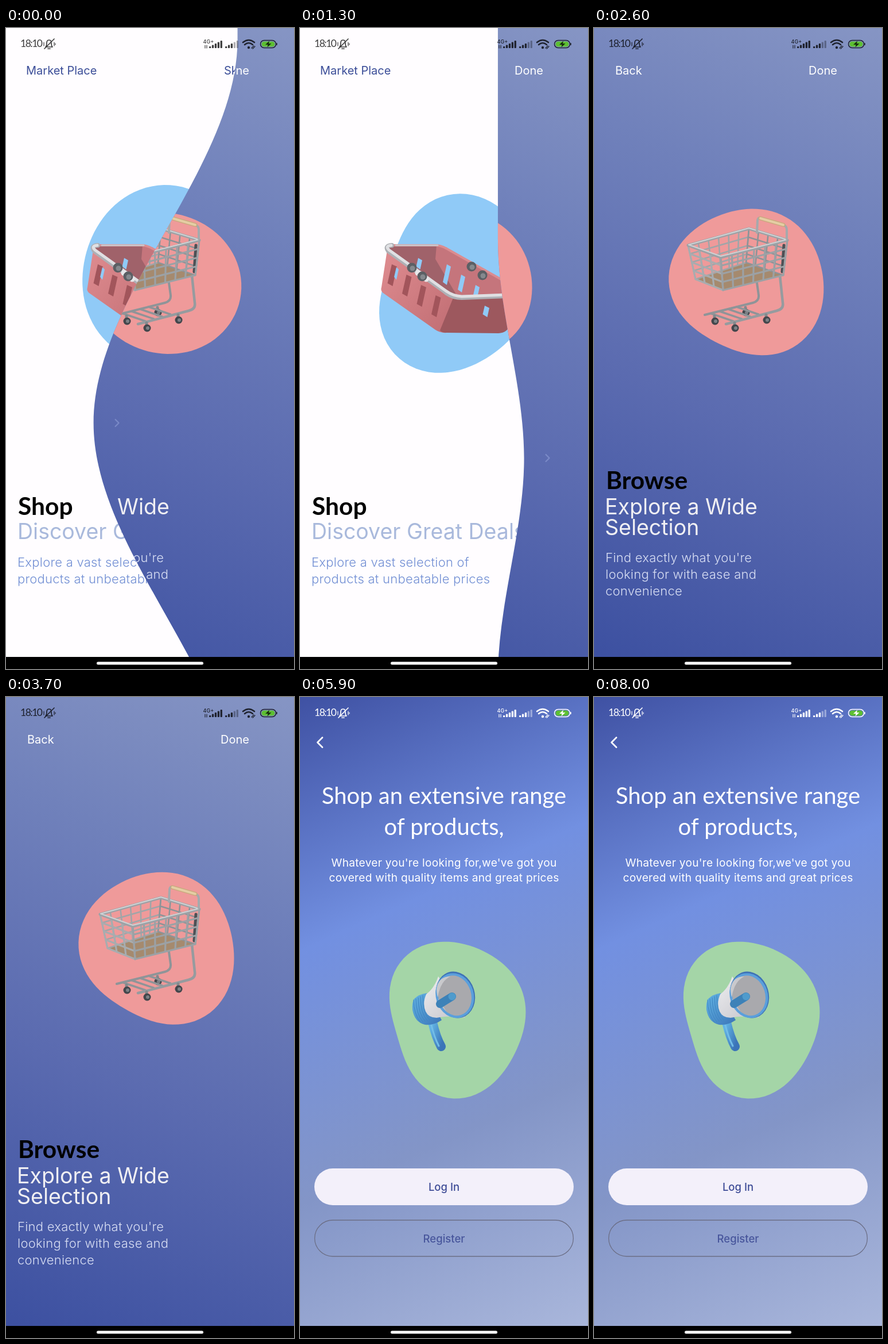
These frames come from a looping animation (502 by 1115 pixels, 8100 ms). An HTML page:

```html
<!DOCTYPE html>
<html lang="en">
<head>
<meta charset="utf-8">
<title>Shop onboarding</title>
<style>
html, body { margin: 0; width: 100%; height: 100%; overflow: hidden; background: #000; }
svg { display: block; width: 100%; height: 100%; font-family: Inter, "Open Sans", sans-serif; }
text { white-space: pre; }
.bar { font-size: 20px; }
.big { font-size: 37.5px; }
.note { font-size: 22px; font-weight: 300; letter-spacing: .25px; }
.fancy { font-family: Lato, sans-serif; }
.word { font-size: 42.5px; font-weight: 700; }
.mid { text-anchor: middle; }
.line { fill: none; stroke-linecap: round; stroke-linejoin: round; }
</style>
</head>
<body>
<svg viewBox="0 0 502 1115" preserveAspectRatio="none">
  <defs>
    <linearGradient id="dusk" gradientUnits="userSpaceOnUse" x1="502" y1="0" x2="0" y2="1115">
      <stop offset="0" stop-color="#8695c4"/>
      <stop offset=".28" stop-color="#7081bb"/>
      <stop offset=".6" stop-color="#5b6bb0"/>
      <stop offset="1" stop-color="#3b4fa0"/>
    </linearGradient>
    <linearGradient id="dawn" gradientUnits="userSpaceOnUse" x1="0" y1="0" x2="502" y2="1115">
      <stop offset="0" stop-color="#3f51a3"/>
      <stop offset=".33" stop-color="#7290e1"/>
      <stop offset=".66" stop-color="#8395c7"/>
      <stop offset="1" stop-color="#abb8dc"/>
    </linearGradient>
    <linearGradient id="front" x1="0" y1="0" x2="1" y2="1">
      <stop offset="0" stop-color="#df8c90"/>
      <stop offset="1" stop-color="#c06d73"/>
    </linearGradient>
    <linearGradient id="tube" x1="0" y1="0" x2="1" y2="1">
      <stop offset="0" stop-color="#62b4e4"/>
      <stop offset="1" stop-color="#3b74b8"/>
    </linearGradient>
    <linearGradient id="horn" x1="0" y1="0" x2="1" y2="1">
      <stop offset="0" stop-color="#eeeef0"/>
      <stop offset="1" stop-color="#c3c3ca"/>
    </linearGradient>
    <clipPath id="reveal"><path id="edge"/></clipPath>
  </defs>

  <g id="shop">
    <rect width="502" height="1115" fill="#fffdff"/>
    <path id="blueBlob" fill="#90caf7"/>
    <g id="basket"></g>
    <g fill="#3b4d98" class="bar">
      <text x="35" y="81">Market Place</text>
      <text x="380" y="81">Skip</text>
    </g>
    <text class="fancy word" x="21" y="847">Shop</text>
    <text class="big" x="20" y="889" fill="#a9b9dc">Discover Great Deals</text>
    <g class="note" fill="#728fd4">
      <text x="20" y="937">Explore a vast selection of</text>
      <text x="20" y="966">products at unbeatable prices</text>
    </g>
  </g>

  <g id="browse" clip-path="url(#reveal)">
    <rect width="502" height="1115" fill="url(#dusk)"/>
    <path id="pinkBlob" fill="#ef9a9a"/>
    <g id="cart"></g>
    <g fill="#fff" class="bar">
      <text x="37" y="81">Back</text>
      <text x="374" y="81">Done</text>
    </g>
    <text class="fancy word" x="21" y="802">Browse</text>
    <g class="big" fill="#f0eff3">
      <text x="19" y="846">Explore a Wide</text>
      <text x="19" y="882">Selection</text>
    </g>
    <g class="note" fill="#d9dff4">
      <text x="20" y="929">Find exactly what you're</text>
      <text x="20" y="958">looking for with ease and</text>
      <text x="20" y="987">convenience</text>
    </g>
  </g>
  <g id="knob">
    <circle id="disc" r="31" fill="#fff"/>
    <path class="line" d="M-3 -6L3 0L-3 6" stroke="#a9b9ea" stroke-width="2.2" opacity=".4"/>
  </g>

  <g id="login">
    <rect width="502" height="1115" fill="url(#dawn)"/>
    <path class="line" d="M39 70.500L30.500 79L39 87.500" stroke="#fff" stroke-width="2.800"/>
    <g class="fancy mid" fill="#fff" font-size="40">
      <text x="251" y="186">Shop an extensive range</text>
      <text x="251" y="240">of products,</text>
    </g>
    <g class="mid" fill="#fff" font-size="19.200" letter-spacing=".25">
      <text x="251" y="295">Whatever you're looking for,we've got you</text>
      <text x="251" y="320.500">covered with quality items and great prices</text>
    </g>
    <path id="greenBlob" fill="#a4d5a7"/>
    <g id="megaphone"></g>
    <rect x="25" y="820" width="452" height="64" rx="32" fill="#f3f0fa"/>
    <rect x="25.600" y="910" width="450.800" height="63" rx="31.500" fill="none" stroke="#6c6f87" stroke-width="1.300"/>
    <g class="mid" font-size="18.500" font-weight="500">
      <text x="251" y="859" fill="#3d4b96">Log In</text>
      <text x="251" y="948.500" fill="#48569c">Register</text>
    </g>
  </g>

  <g id="status"></g>
  <rect y="1094" width="502" height="21"/>
  <rect x="158" y="1102.500" width="186" height="5" rx="2.500" fill="#fff"/>
</svg>
<script>
const $ = id => document.getElementById(id);
const mix = (a, b, u) => a + (b - a) * u;
const mixAll = (a, b, u) => a.map((v, i) => mix(v, b[i], u));
const clamp = u => Math.min(1, Math.max(0, u));
const smooth = u => u * u * (3 - 2 * u);
const line = (d, color, width) =>
  `<path class="line" d="${d}" stroke="${color}" stroke-width="${width}"/>`;
const fill = (d, color) => `<path d="${d}" fill="${color}"/>`;
const dot = (x, y, r, color) => `<circle cx="${x}" cy="${y}" r="${r}" fill="${color}"/>`;

// Circle bent by an oval and a three-cornered wave; turns are in degrees
function blob({ x, y, r, oval, ovalTurn, tri, triTurn }) {
  const rad = Math.PI / 180;
  const points = Array.from({ length: 90 }, (_, i) => {
    const deg = i * 4;
    const size = r + oval * Math.cos(2 * (deg - ovalTurn) * rad) + tri * Math.cos(3 * (deg - triTurn) * rad);
    return [x + size * Math.cos(deg * rad), y + size * Math.sin(deg * rad)];
  });
  return `M${points.join('L')}Z`;
}

function blueShape(t) {
  const k = clamp(t / 2000);
  return {
    x: 270 + 5 * k, y: 427 + 31 * k, r: 145 - 3 * k,
    oval: 10 + 8.5 * k, ovalTurn: 105 + 12 * k, tri: 10 * k, triTurn: 16
  };
}

function pinkShape(t) {
  const k = clamp(t / 5200);
  return {
    x: 277 - 14 * k, y: 444 - 21 * k ** 3, r: 128 + 10 * k * k,
    oval: 6, ovalTurn: 15 + 57 * k ** 3, tri: 5.5 * Math.sin(2.2 * k), triTurn: 58
  };
}

const greenShape = { x: 273, y: 557, r: 126, oval: 10.6, ovalTurn: 78, tri: 7, triTurn: -19 };

// Grid of bars on the quad a-b (top) to d-c (bottom)
function mesh(a, b, c, d, cols, rows, color, width) {
  let path = '';
  for (let i = 0; i <= cols; i++)
    path += `M${mixAll(a, b, i / cols)}L${mixAll(d, c, i / cols)}`;
  for (let j = 1; j <= rows; j++)
    path += `M${mixAll(a, d, j / rows)}L${mixAll(b, c, j / rows)}`;
  return line(path, color, width);
}

function drawBasket() {
  const slot = (x, y, w, h, color) =>
    fill(`M${x} ${y}l${w} 4l${-h * .22} ${h}l${-w} -5Z`, color);
  const sky = '#90caf7', dark = '#a2555b';
  const knob = (x, y) => dot(x, y, 8.5, '#5b5f64') + dot(x + 1, y + 1, 4.5, '#85898e');
  const frontSlots = [0, 1, 2, 3].map(i => slot(160 + 25.5 * i, 411 + 18 * i, 9, 34, dark)).join('');
  const backSlots = [0, 1, 2].map(i => slot(256 + 25 * i, 411 + 18 * i, 7, 32 - 5 * i, sky)).join('');
  $('basket').innerHTML =
    fill('M153 384Q156 378 166 378L238 378L390 460L270 470Z', '#a0626a') +
    fill('M238 378Q246 378 254 383L386 456L376 472L275 468L236 402Z', '#c5757c') +
    slot(206, 400, 7, 16, sky) + backSlots +
    line('M160 378L236 378Q246 378 256 384L384 456', '#db8c90', 4) +
    knob(299, 415) + knob(318, 430) +
    fill('M152 386L270 468L256 530Q245 531 236 525L145 461Q140 457 142 451Z', 'url(#front)') +
    fill('M268 467L384 465L366 516Q362 530 346 531L255 530Q247 530 244 526Z', '#9d585e') +
    frontSlots + slot(168, 416, 4, 18, sky) + slot(322, 483, 8, 16, sky) +
    line('M167 378L240 378', '#c9c6ca', 3) +
    line('M160 378Q147 379 154 388L252 458Q264 469 282 469L386 465', '#aeb0b5', 8) +
    line('M159 378Q148 379 155 386L254 457Q266 466 282 467L385 463', '#e0e0e3', 5) +
    line('M205 426L220 437', '#e8e8ea', 9) +
    knob(195, 417) + knob(213, 432);
}

function drawCart() {
  const left = [164, 378], near = [221, 399], right = [337, 369], far = [270, 349];
  const lowLeft = [177, 437], lowNear = [225, 456], lowRight = [330, 430], lowFar = [265, 408];
  const wheel = (x, y) => line(`M${x - 1} ${y - 9}v4`, '#84888c', 5) +
    dot(x, y, 6.5, '#43474c') + dot(x + 1, y, 3, '#7c8085');
  const slats = [0, 1, 2, 3].map(i => `M${205 + 14.5 * i} ${497 - 4 * i}l38 13`).join('');
  const wood = 'M290 331L330 342.500';
  $('cart').innerHTML =
    wheel(265, 495) +
    line('M283 436L287 465Q288 475 277 478L193 499', '#8f9498', 4) +
    line(slats, '#8f9498', 3.5) +
    line('M324 430L329 478Q331 489 318 492L230 515', '#969b9f', 4.5) +
    wheel(211, 510) + wheel(246, 522) + wheel(301, 508) +
    fill(`M${lowLeft}L${lowFar}L${lowRight}L${lowNear}Z`, '#a58a6e') +
    mesh(left, far, lowFar, lowLeft, 6, 4, '#a1a5a8', 2.6) +
    mesh(far, right, lowRight, lowFar, 4, 4, '#8e9397', 2.6) +
    line('M331 378L328 424', '#4d5156', 5) +
    mesh(left, near, lowNear, lowLeft, 3, 4, '#a8acaf', 3.2) +
    mesh(near, right, lowRight, lowNear, 6, 4, '#9ca1a5', 3.2) +
    line(`M${left}L${near}L${right}L${far}Z`, '#9da2a6', 5) +
    line('M165 377L221 397L336 368L270 348Z', '#cfd2d4', 2) +
    line('M284 356L285 335Q286 328 292 331L329 342Q336 344 336 351L336 367', '#a5a9ac', 4) +
    line(wood, '#c8a97c', 7) + line(wood, '#e5cda4', 4);
}

function drawMegaphone() {
  const rings = Array.from({ length: 5 }, (_, i) =>
    `M${198 + i * 4} ${527 - i * 2}Q${198 + i * 4} 551 ${210 + i * 4} ${566 - i}`).join('');
  $('megaphone').innerHTML =
    line('M231 566Q237 592 246 608', 'url(#tube)', 16) +
    line('M228 567Q234 592 242 607', '#73bde8', 3) +
    fill('M199 525Q207 517 221 515L247 562Q232 572 218 570Q200 566 196 544Q195 531 199 525Z', 'url(#tube)') +
    line(rings, '#3e86c2', 1) +
    fill('M241 486Q234 507 220 517Q213 533 219 547Q224 558 238 558Q265 553 288 558Z', 'url(#horn)') +
    '<g transform="rotate(-17 271 518)">' +
    '<ellipse cx="271" cy="518" rx="33.500" ry="41" fill="#3f72b5"/>' +
    '<ellipse cx="269.500" cy="519" rx="33" ry="39.500" fill="#5a9fdc"/>' +
    '<ellipse cx="269.500" cy="519" rx="28.500" ry="35.500" fill="#a9a9ad"/></g>' +
    fill('M240 523Q244 495 262 486Q241 486 238 508Q238 530 255 547Z', '#c9c9cc') +
    line('M244 534L265 521', '#3d82b8', 14) +
    dot(265, 521, 6.5, '#4f9bcc');
}

function drawStatus() {
  const ink = 'currentColor';
  const bars = (x, strong) => Array.from({ length: 5 }, (_, i) =>
    `<rect x="${x + i * 4.9}" y="${32 - i * 2.5}" width="3.300" height="${3 + i * 2.5}" rx="1"` +
    ` opacity="${i < strong ? 1 : .4}"/>`).join('');
  $('status').innerHTML = `<g fill="currentColor">
    <text class="fancy" x="25" y="33" font-size="17.500" letter-spacing="-1.500">18:10</text>
    <text x="343.500" y="27" font-size="9" font-weight="500">4G+</text>
    ${bars(354, 5)}${bars(382, 3)}
    ${dot(423, 34, 2.2, ink)}</g>` +
    line('M69 33H81Q79 31 79 26Q79 21 75 21Q71 21 71 26Q71 31 69 33M73 36H77M84 19L67 36', ink, 1.7) +
    line('M66 25V31M84 25V31M86 27V29', ink, 1.2) +
    line('M347 30V35M350 30V35', ink, 1.2) +
    line('M413 25Q423 17 433 25M416 29Q423 23 430 29', ink, 2.6) +
    line('M428 35L432 31M430 36L434 32', ink, 1.4) +
    '<rect x="443.500" y="21.500" width="27" height="13" rx="6.500" fill="none" stroke="currentColor" stroke-width="1.500"/>' +
    '<rect x="445.500" y="23.500" width="23" height="9" rx="4.500" fill="#5dbf32"/>' +
    '<path d="M472 26v4" stroke="currentColor" stroke-width="1.500"/>' +
    fill('M459 22.500L452 29H456.500L455.500 33.500L462.500 27H458Z', ink);
}

// The wave's crest runs ahead of its sides; way 1 opens the second page, -1 closes it
const strokes = [
  { start: -170, time: 650, lead: 221, y: 687, way: 1 },
  { start: 780, time: 800, lead: 54, y: 748, way: -1 },
  { start: 1937, time: 650, lead: 280, y: 772, way: 1 }
];

function waveAt(t) {
  const xAt = ahead => 492 - 522 * strokes.reduce((sum, s) =>
    sum + s.way * smooth(clamp((t - s.start + ahead * s.lead) / s.time)), 0);
  const begun = strokes.filter(s => t >= s.start - s.lead);
  const crest = xAt(1);
  return { side: xAt(0), crest, y: begun[begun.length - 1].y, half: 850 - 1.2 * crest };
}

function edgePath({ side, crest, y, half }) {
  const third = half / 3;
  return `M502 -400H${side}V${y - half}` +
    `C${side} ${y - 2 * third} ${crest} ${y - third} ${crest} ${y}` +
    `C${crest} ${y + third} ${side} ${y + 2 * third} ${side} ${y + half}V2000H502Z`;
}

const LOOP = 8100, STEP = 100;

function render(ms) {
  const t = Math.floor(ms % LOOP / STEP) * STEP;
  const wave = waveAt(t);
  $('edge').setAttribute('d', edgePath(wave));
  $('blueBlob').setAttribute('d', blob(blueShape(t)));
  $('pinkBlob').setAttribute('d', blob(pinkShape(t)));

  const { side, crest, y } = wave;
  $('knob').setAttribute('transform', `translate(${crest + 41} ${y})`);
  $('knob').setAttribute('opacity', crest < -15 ? 0 : mix(.25, 1, clamp(side / 300)));
  $('disc').setAttribute('opacity', .05 * clamp((side - 410) / 50));

  const login = t < 5300 ? 0 : t < 5400 ? .5 : 1;
  $('login').setAttribute('opacity', login);
  $('status').setAttribute('color', login ? '#fff' : 'rgba(0,0,0,.76)');
}

drawBasket();
drawCart();
drawMegaphone();
drawStatus();
$('greenBlob').setAttribute('d', blob(greenShape));

const start = performance.now();
function tick() {
  render(performance.now() - start);
  requestAnimationFrame(tick);
}
render(0);
requestAnimationFrame(tick);
</script>
</body>
</html>
```
